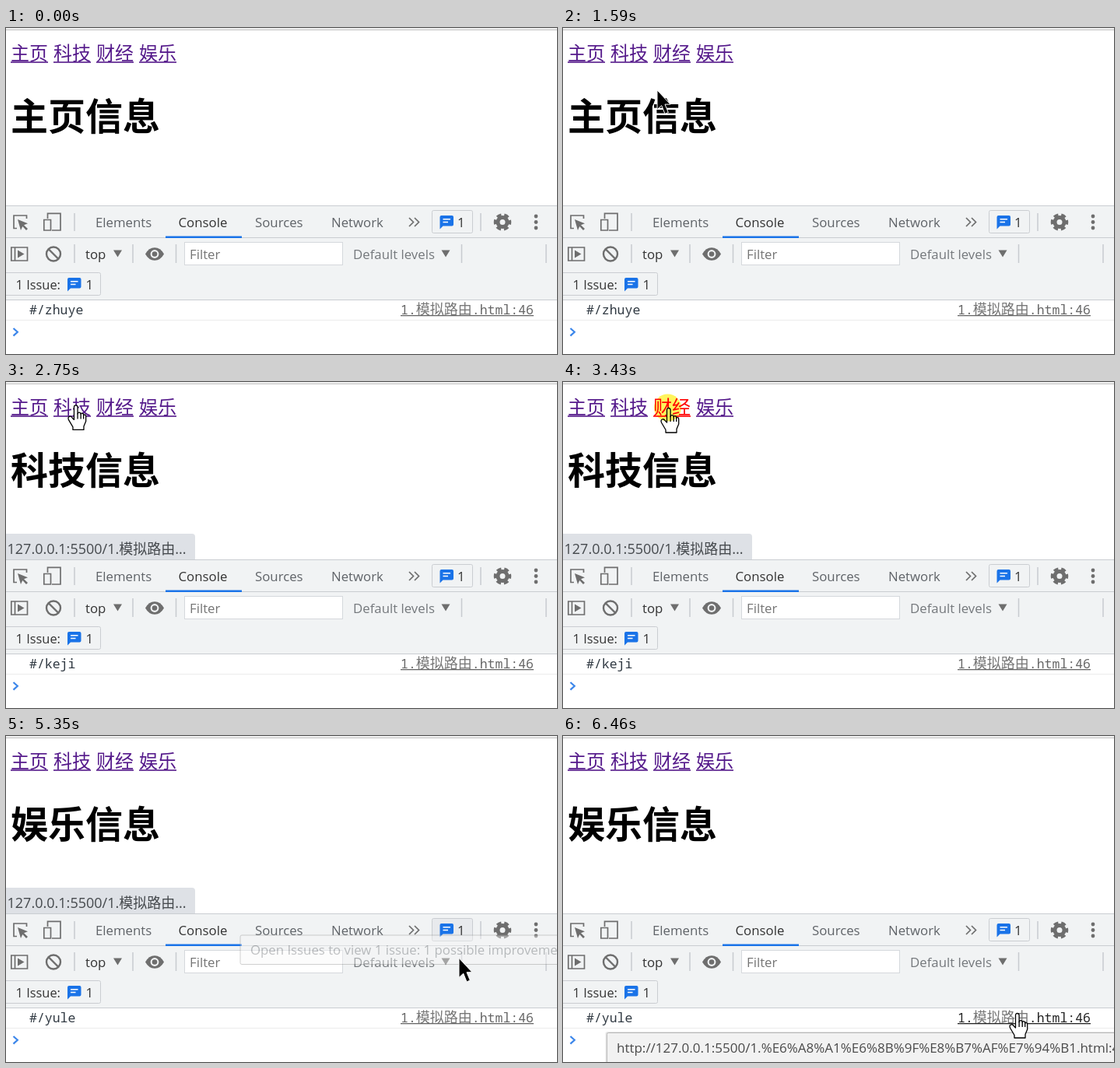
An HTML page that plays this animation: 708x419 px, repeating every 6.53 s.

```html
<!DOCTYPE html>
<html lang="zh-CN">
<head>
<meta charset="utf-8">
<title>模拟路由</title>
<style>
  html, body { margin: 0; width: 100%; height: 100%; overflow: hidden; background: #fff; }
  svg { display: block; width: 708px; height: 419px; }
  text { font: 16.8px "Open Sans", "Noto Sans CJK SC", "Noto Sans CJK", sans-serif; fill: #5f6368; white-space: pre; }
  .dark { fill: #333; }
  .nav text { font: 24px "Noto Sans CJK SC", "Noto Sans CJK", sans-serif; fill: inherit; }
  .nav g { fill: #551a8b; stroke: none; }
  .nav g.active { fill: #f00; }
  #title { font: 700 48px "Noto Sans CJK SC", "Noto Sans CJK", sans-serif; fill: #000; }
  .mono { font: 16.5px "Noto Sans Mono", "DejaVu Sans Mono", monospace; fill: #303942; }
  .cjk { font: 300 18px "Noto Sans CJK SC", "Noto Sans CJK", sans-serif; fill: #777; }
  #file { fill: #666; }
  #file .mono { fill: inherit; }
  #file.hover { fill: #222; }
  .icon { fill: none; stroke: #6e6e6e; stroke-width: 1.7; }
  .solid { fill: #6e6e6e; }
  .box { fill: #f1f3f4; stroke: #cacdd1; }
  #issues.hover { fill: #e8eaed; }
  .sep { stroke: #c8cbcf; stroke-width: 1.5; }
  #press { fill: #fff45c; mix-blend-mode: multiply; }
</style>
</head>
<body>
<svg viewBox="0 0 708 419">
  <defs>
    <g id="bubble">
      <path d="M2 0H15.500Q17.500 0 17.500 2V11.500Q17.500 13.500 15.500 13.500H4L0 17.500V2Q0 0 2 0Z" fill="#1a73e8"/>
      <path d="M4 4.700H13.500M4 8.500H10.500" stroke="#fff" stroke-width="1.600"/>
    </g>
  </defs>

  <rect width="708" height="419" fill="#fff"/>
  <rect width="708" height="2" fill="#f0f0f0"/>
  <rect y="2" width="708" height="1" fill="#c4c4c4"/>
  <g class="nav" id="nav"></g>
  <text id="title" x="6" y="131"></text>

  <g id="status">
    <path d="M0 195H239Q243 195 243 199V229H0Z" fill="#dee1e6"/>
    <text x="1.500" y="221" style="font-size:18px;fill:#45494d">127.0.0.1:5500/1.模拟路由...</text>
  </g>

  <rect y="228" width="708" height="122" fill="#f1f3f4"/>
  <path d="M0 228.500H708M0 269.500H708M0 349.500H708" stroke="#cacdd1"/>
  <rect x="205" y="267.500" width="98" height="2.500" fill="#1a73e8"/>

  <!-- tab bar -->
  <path class="icon" d="M14 257.500H10V241H26.500V245"/>
  <path class="solid" d="M15 246L28 251.300L23 253.300L28 258L26 260L21.300 255L19 260Z"/>
  <path class="icon" d="M53.500 245V238.300H70V260H59M48.800 246.500H57.500V260H48.800Z"/>
  <path class="sep" d="M88 238V261M610 238V261M88 278V302M163 278V302M218.500 278V302M585.500 278V302M694 278V302"/>
  <text x="115" y="256">Elements</text>
  <text x="221.500" y="256" class="dark">Console</text>
  <text x="320" y="256">Sources</text>
  <text x="418" y="256">Network</text>
  <path class="icon" d="M518 244L523.500 249.500L518 255M525 244L530.500 249.500L525 255"/>
  <rect id="issues" class="box" x="547.500" y="234.500" width="52" height="29" rx="2"/>
  <use href="#bubble" x="557.500" y="241"/>
  <text x="580" y="256" class="dark">1</text>
  <circle class="icon" cx="638" cy="249.500" r="6" style="stroke-width:5"/>
  <circle class="icon" cx="638" cy="249.500" r="9.500" style="stroke-width:3.500" stroke-dasharray="6 3.950" stroke-dashoffset="3"/>
  <g class="solid"><circle cx="681" cy="242" r="2.400"/><circle cx="681" cy="249.500" r="2.400"/><circle cx="681" cy="257" r="2.400"/></g>

  <!-- filter bar -->
  <path class="icon" d="M6.800 282H27.500V299H6.800ZM11.500 282V299"/>
  <path class="solid" d="M15 285.500L23.500 290.500L15 295.500Z"/>
  <path class="icon" d="M54.500 284L67.500 297M70 290.500A9 9 0 1 1 52 290.500A9 9 0 1 1 70 290.500Z" style="stroke-width:2.400"/>
  <text x="102" y="297" class="dark">top</text>
  <path class="solid" d="M138 285.500H149L143.500 294.500ZM559.500 285.500H570.500L565 294.500Z"/>
  <path class="solid" d="M179 290.500Q183.500 282.300 191 282.300T203 290.500Q198.500 298.700 191 298.700T179 290.500Z"/>
  <circle cx="191" cy="290.500" r="5.400" fill="#f1f3f4"/>
  <circle class="solid" cx="191" cy="290.500" r="3.300"/>
  <rect x="229.500" y="275.500" width="203" height="29" fill="#fff" stroke="#d5d8dc"/>
  <text x="236" y="297" style="fill:#757575">Filter</text>
  <text x="446" y="297" style="fill:#74787c">Default levels</text>

  <rect class="box" x="-4" y="314.500" width="125.500" height="29" rx="2"/>
  <text x="12.500" y="336" class="dark" style="font-size:16.400px">1 Issue:</text>
  <use href="#bubble" x="79" y="321"/>
  <text x="102.500" y="336" class="dark">1</text>

  <!-- console output -->
  <text id="hash" class="mono" x="30" y="368"></text>
  <g id="file">
    <text class="mono" x="507" y="368">1.</text>
    <text class="cjk" x="526.800" y="368">模拟路由</text>
    <text class="mono" x="598.800" y="368">.html:46</text>
    <rect x="507" y="369" width="171" height="1.300"/>
  </g>
  <rect y="375" width="708" height="1" fill="#ececec"/>
  <path d="M9.500 386L14.800 390.800L9.500 395.600" fill="none" stroke="#3b86ea" stroke-width="2.200"/>

  <g id="issueTip">
    <rect x="301" y="256" width="420" height="37.500" rx="2" fill="#f8f8f8" stroke="#888"/>
    <text x="314" y="281">Open Issues to view 1 issue: 1 possible improvements</text>
  </g>
  <g id="urlTip">
    <rect x="54.500" y="380" width="670" height="50" rx="3" fill="#000" opacity=".1"/>
    <rect x="56.500" y="381.500" width="670" height="50" rx="2" fill="#f2f2f2" stroke="#b9b9b9"/>
    <text x="69" y="407" style="font-size:17px;fill:#4a4a4a">http://127.0.0.1:5500/1.%E6%A8%A1%E6%8B%9F%E8%B7%AF%E7%94%B1.html:46</text>
  </g>

  <g id="cursor">
    <path id="arrow" d="M0 0V25L5.700 19.800L10 30.500L14.300 28.700L10 18.300H17Z" fill="#000" stroke="#fff"/>
    <g id="hand" stroke="#000" stroke-width="1.300" stroke-linejoin="round">
      <path d="M-2.500 18V2Q-2.500 -.500 -.200 -.500T2.100 2V10.500Q2.500 8.500 4.300 8.700T6.200 11Q6.500 9.500 8 9.700T9.700 12Q12.700 10.500 12.700 14V20L10 26.500V31H-4V27.500L-9.300 18.500Q-11 15 -8.500 14T-4.500 16Z" fill="#fff"/>
      <path d="M2.100 10V17M6.200 11V17M9.700 12V17" fill="none"/>
    </g>
  </g>
  <circle id="press" r="17.500"/>
</svg>

<script>
const LOOP = 6530;
const $ = id => document.getElementById(id);

const pages = [
  { name: '主页', hash: 'zhuye', from: 0 },
  { name: '科技', hash: 'keji', from: 2210, down: 2070, ring: 2280 },
  { name: '财经', hash: 'caijing', from: 3500, down: 3360, ring: 3570 },
  { name: '娱乐', hash: 'yule', from: 4730, down: 4530, ring: 4800 }
];

// time, x, y of the pointer tip
const path = [
  [130, 97, 383], [420, 72, 376], [760, 46, 372], [830, 36, 371], [970, 62, 366],
  [1100, 81, 361], [1250, 344, 225], [1350, 220, 140], [1450, 150, 104],
  [1800, 78, 44], [1930, 69, 28], [2140, 69, 26], [2610, 69, 26], [2960, 121, 37],
  [3160, 121, 37], [3360, 136, 34], [3770, 136, 34], [4080, 168, 27], [4390, 199, 37],
  [4460, 200, 38], [5070, 200, 38], [5140, 330, 120], [5210, 500, 215], [5280, 576, 250],
  [5350, 582, 285], [5490, 584, 340], [5700, 590, 389], [5970, 590, 389], [6250, 584, 357]
];
const issueFade = [[5260, 0], [5300, .35], [5350, .4], [5420, .2], [5490, 0]];
const urlFade = [[6220, 0], [6390, 1]];

function track(keys, t) {
  const i = keys.findIndex(k => k[0] > t);
  if (i < 0) return keys[keys.length - 1].slice(1);
  if (i === 0) return keys[0].slice(1);
  const a = keys[i - 1], b = keys[i], p = (t - a[0]) / (b[0] - a[0]);
  return a.slice(1).map((v, n) => v + (b[n + 1] - v) * p);
}

const links = pages.map((page, i) => {
  const x = 6 + i * 55;
  $('nav').insertAdjacentHTML('beforeend',
    `<g><text x="${x}" y="41">${page.name}</text><rect x="${x}" y="43.2" width="48" height="1.6"/></g>`);
  return $('nav').lastChild;
});

const show = (id, on) => { $(id).style.display = on ? '' : 'none'; };
const inside = (x, y, l, t, r, b) => x >= l && x <= r && y >= t && y <= b;

function render(t) {
  const [x, y] = track(path, t);
  const page = pages.filter(p => t >= p.from).pop();
  $('title').textContent = page.name + '信息';
  $('hash').textContent = '#/' + page.hash;
  links.forEach((link, i) => {
    link.classList.toggle('active', t >= pages[i].down && t < pages[i].from);
  });

  const onFile = inside(x, y, 507, 353, 678, 372);
  const hand = onFile || inside(x, y, 6, 16, 220, 47);
  show('cursor', t >= 130);
  show('hand', hand);
  show('arrow', !hand);
  $('cursor').setAttribute('transform', `translate(${x} ${y})`);

  show('press', pages.some(p => t >= p.down && t < p.ring));
  $('press').setAttribute('transform', `translate(${x - 1.5} ${y - 1})`);

  show('status', t >= 1790 && t < 5420);
  $('file').classList.toggle('hover', onFile);
  $('issues').classList.toggle('hover', t >= 5250 && t < 5420);
  $('issueTip').style.opacity = track(issueFade, t)[0];
  $('urlTip').style.opacity = track(urlFade, t)[0];
}

const start = performance.now();
function tick(now) {
  render(Math.max(0, now - start) % LOOP);
  requestAnimationFrame(tick);
}
render(0);
requestAnimationFrame(tick);
</script>
</body>
</html>
```
